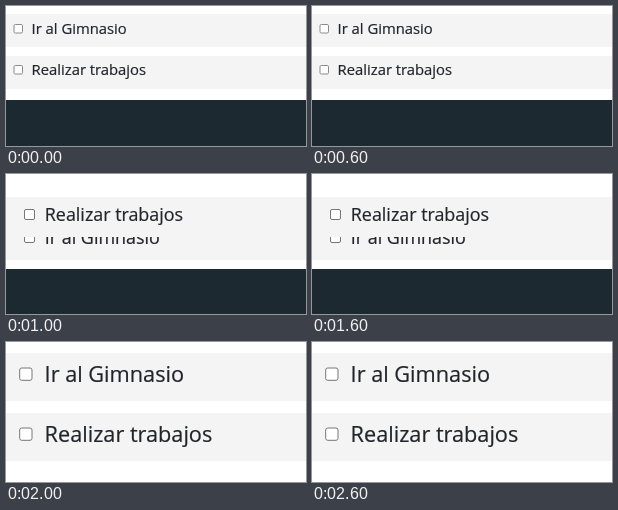
Write an HTML page that moves like this. It is 300 px wide and 140 px high and loops after 3000 ms.

```html
<!DOCTYPE html>
<html lang="es">
<head>
<meta charset="utf-8">
<title>Lista de tareas</title>
<style>
  html, body { margin: 0; width: 100%; height: 100%; overflow: hidden; background: #fff; }
  svg { display: block; width: 300px; height: 140px; }
  text { font-family: "Open Sans", "Noto Sans", sans-serif; fill: #212529; stroke: #212529; stroke-width: .2px; }
  .bar { fill: #f4f4f4; }
  .dark { fill: #1c2930; }
  .box { fill: #fff; stroke: #767676; }
  .scene { visibility: hidden; animation: show 3s step-end infinite; }
  #list .box { stroke: #8a8a8a; }
  #drag { animation-delay: -2s; }
  #zoom { animation-delay: -1s; }
  @keyframes show {
    0% { visibility: visible; }
    33.3333%, 100% { visibility: hidden; }
  }
</style>
</head>
<body>
<svg viewBox="0 0 300 140">
  <clipPath id="below"><rect y="63" width="300" height="32"/></clipPath>

  <g class="scene" id="list">
    <rect class="bar" y="8" width="300" height="33"/>
    <rect class="box" x="8" y="18.5" width="8.5" height="8.5" rx="1.3"/>
    <text x="25.6" y="27.8" font-size="14.8">Ir al Gimnasio</text>
    <rect class="bar" y="50" width="300" height="33"/>
    <rect class="box" x="8" y="59.5" width="8.5" height="8.5" rx="1.3"/>
    <text x="25.6" y="69.2" font-size="14.8">Realizar trabajos</text>
    <rect class="dark" y="94" width="300" height="46"/>
  </g>

  <g class="scene" id="drag">
    <rect class="bar" y="23" width="300" height="63"/>
    <rect class="box" x="18.5" y="35.5" width="10" height="10" rx="1.5"/>
    <text x="38.8" y="47" font-size="17.9">Realizar trabajos</text>
    <g clip-path="url(#below)">
      <rect class="box" x="18.5" y="58.5" width="10" height="10" rx="1.5"/>
      <text x="38.8" y="70" font-size="17.9">Ir al Gimnasio</text>
    </g>
    <rect class="dark" y="95" width="300" height="45"/>
  </g>

  <g class="scene" id="zoom">
    <rect class="bar" y="11" width="300" height="48"/>
    <rect class="box" x="13.7" y="26" width="12.3" height="12.3" rx="2"/>
    <text x="38.6" y="40" font-size="21.7">Ir al Gimnasio</text>
    <rect class="bar" y="71" width="300" height="48"/>
    <rect class="box" x="13.7" y="86" width="12.3" height="12.3" rx="2"/>
    <text x="38.6" y="100" font-size="21.7">Realizar trabajos</text>
  </g>
</svg>
</body>
</html>
```
